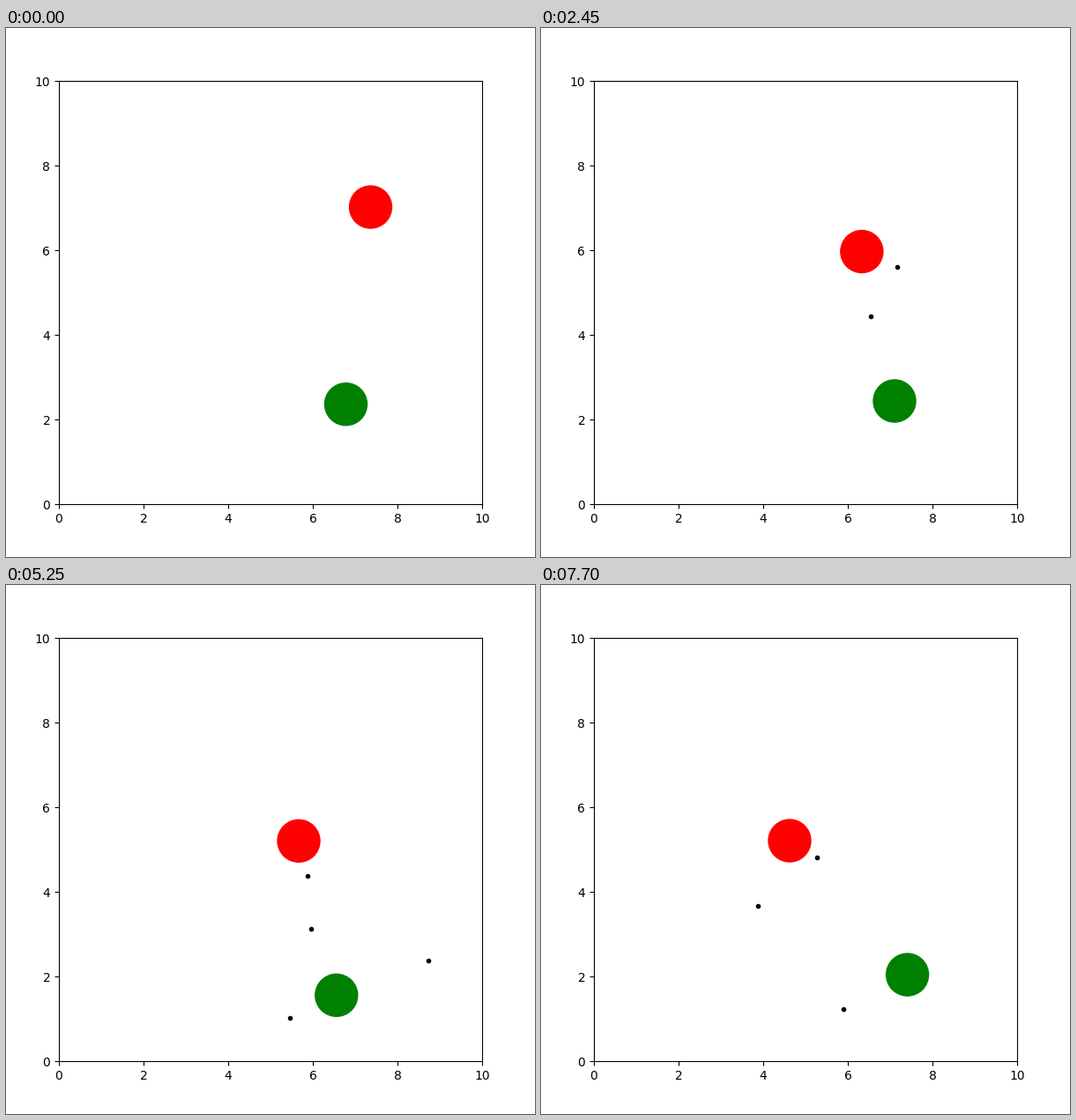
A matplotlib script for the animation above (8000 ms loop, 600 px wide and 600 px high).

```python
import numpy as np
import matplotlib.pyplot as plt
from matplotlib.animation import FuncAnimation

TICK, STEP, LOOP = 50, 350, 8000  # ms
RELOAD = 4  # steps between shots
SPEED = 0.45  # shot travel per step
HEADINGS = np.radians([-107.7, -64.2, -94.7, -89.5, -137.6, -39.9])

# Turning points: step, x, y; straight and even motion between them
RED_TURNS = [
    (0, 7.365, 7.019), (9, 6.035, 5.667), (11, 5.954, 5.396),
    (13, 5.773, 5.171), (15, 5.667, 5.202), (16, 5.529, 5.190),
    (18, 5.229, 5.056), (20, 4.925, 5.092), (22, 4.625, 5.208),
]
GREEN_TURNS = [
    (0, 6.781, 2.360), (3, 7.021, 2.569), (5, 7.200, 2.640),
    (7, 7.104, 2.437), (9, 6.927, 2.025), (11, 6.746, 1.958),
    (13, 6.604, 1.671), (15, 6.558, 1.556), (20, 7.263, 1.667),
    (21, 7.496, 1.844), (22, 7.408, 2.042),
]


def position(turns, step):
    steps, xs, ys = zip(*turns)
    return np.interp(step, steps, xs), np.interp(step, steps, ys)


fig = plt.figure(figsize=(6, 6), dpi=100)
ax = fig.add_axes([0.1, 0.1, 0.8, 0.8])
ax.set(xlim=(0, 10), ylim=(0, 10))

red = ax.add_patch(plt.Circle((0, 0), 0.5, color="red"))
green = ax.add_patch(plt.Circle((0, 0), 0.5, color="green"))
shots, = ax.plot([], [], "ko", markersize=3)

# Each shot leaves from where the red ball was when it fired
fired = RELOAD * np.arange(len(HEADINGS))
start_x, start_y = position(RED_TURNS, fired)


def update(i):
    step = i * TICK // STEP
    red.center = position(RED_TURNS, step)
    green.center = position(GREEN_TURNS, step)

    age = step - fired - 1
    x = start_x + SPEED * age * np.cos(HEADINGS)
    y = start_y + SPEED * age * np.sin(HEADINGS)
    live = (age >= 0) & (y >= 0)
    shots.set_data(x[live], y[live])
    return red, green, shots


anim = FuncAnimation(fig, update, frames=LOOP // TICK, interval=TICK,
                     repeat=True, repeat_delay=0)
plt.show()
```
